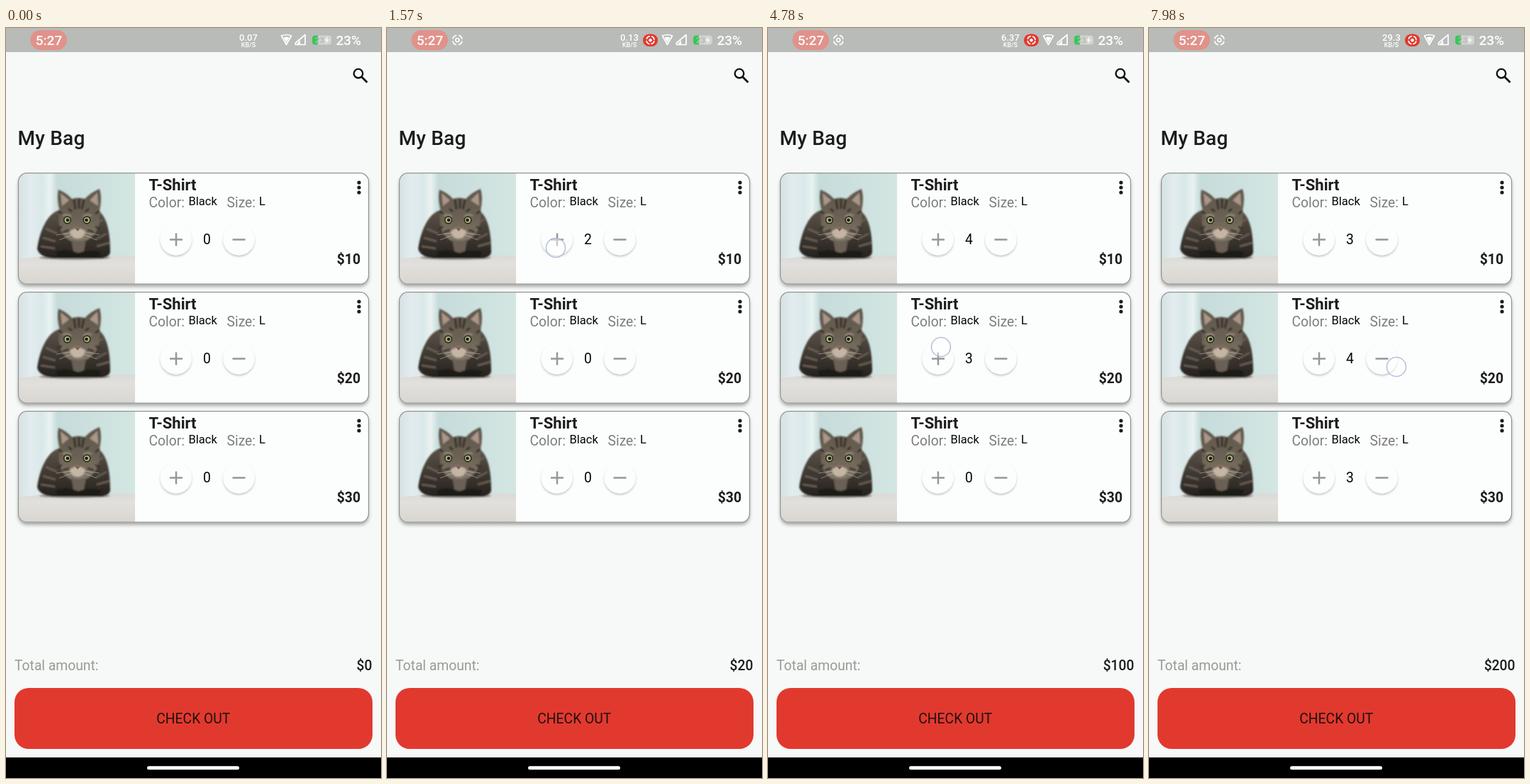
An HTML page that plays this animation: 529 by 1058 pixels, repeating every 8000 ms.

```html
<!DOCTYPE html>
<html lang="en">
<head>
<meta charset="utf-8">
<title>My Bag</title>
<style>
  html, body { margin: 0; height: 100%; overflow: hidden; background: #f6f9f7; }
  svg { display: block; width: 100vw; height: 100vh; font: 19.29px Roboto, sans-serif; fill: #1b1c1b; }
  .status { fill: #fff; font-weight: 500; font-size: 19px; }
  .line { fill: none; stroke: #fff; stroke-width: 1.7; }
  .mid { text-anchor: middle; }
  .end { text-anchor: end; }
  .grey { fill: #7d7e7d; }
  .small { font-size: 16.53px; fill: #050505; }
  .bold { font-weight: 700; }
</style>
</head>
<body>
<svg viewBox="0 0 529 1058" preserveAspectRatio="none">
  <defs>
    <linearGradient id="wall">
      <stop offset="0" stop-color="#d6e2e4"/><stop offset=".1" stop-color="#e3ecee"/>
      <stop offset=".2" stop-color="#dae8e9"/><stop offset=".27" stop-color="#e9f2f1"/>
      <stop offset=".33" stop-color="#c6dcdb"/><stop offset="1" stop-color="#d3e6e2"/>
    </linearGradient>
    <linearGradient id="floor" x2="0" y2="1">
      <stop offset="0" stop-color="#dbd9d6"/><stop offset=".3" stop-color="#e2e0dc"/>
      <stop offset="1" stop-color="#d9d6d1"/>
    </linearGradient>
    <linearGradient id="fur" x2="0" y2="1">
      <stop offset="0" stop-color="#5b5248"/><stop offset="1" stop-color="#25211e"/>
    </linearGradient>
    <linearGradient id="face" x2="0" y2="1">
      <stop offset="0" stop-color="#5d554a"/><stop offset=".55" stop-color="#6b6254"/>
      <stop offset="1" stop-color="#857a6b"/>
    </linearGradient>
    <filter id="soft"><feGaussianBlur stdDeviation=".9"/></filter>
    <filter id="cardShadow" x="-5%" y="-10%" width="110%" height="125%">
      <feDropShadow dx="0" dy="3.500" stdDeviation="2.600" flood-opacity=".34"/>
    </filter>
    <filter id="buttonShadow" x="-20%" y="-20%" width="140%" height="150%">
      <feDropShadow dx="0" dy="2" stdDeviation="1.500" flood-opacity=".23"/>
    </filter>
    <clipPath id="photoClip"><path d="M182 205H30a12 12 0 0 0-12 12v132a12 12 0 0 0 12 12H182z"/></clipPath>

    <g id="photo" clip-path="url(#photoClip)">
      <path d="M18 205h164v156H18z" fill="url(#wall)"/>
      <path d="M18 326l45-5h119v40H18z" fill="url(#floor)"/>
      <g filter="url(#soft)">
        <ellipse cx="97" cy="324" rx="50" ry="3" fill="#96928d"/>
        <path d="M76 257C58 260 47 288 44 312Q48 324 68 325H134Q148 323 147 314C147 290 143 265 129 257z" fill="url(#fur)"/>
        <path d="M52 296l18 5m-21 7l20 3M56 283l16 7m70 0l-15 8m19 5l-18 5m9-38l-10 6" fill="none" stroke="#6b6155" stroke-width="2.500"/>
        <path d="M76 259Q71 241 74 228Q86 233 93 241Q102 238 111 241Q121 231 132 227Q136 240 132 258Q134 276 126 289Q116 302 102 303Q87 302 79 289Q72 273 76 259z" fill="url(#face)"/>
        <path d="M79 251l-2-18 12 10zM118 243l11-11 1 19z" fill="#ab978a"/>
        <path d="M92 298q10 5 21 0l-3 17q-8 4-15 0z" fill="#6b6154"/>
        <path d="M70 316q16-6 32 2q14-7 32-2l-3 8H73z" fill="#1e1a18"/>
        <path d="M96 242l2 14m5-15v14m7-13l-3 14M79 262l-5-4m5 22l-6 4m53-22l6-4m-6 22l6 4M80 288l9-3m35 3l-9-3M88 255l5 4m24-4l-5 4"
          fill="none" stroke="#302a25" stroke-width="2.600"/>
        <path d="M80 265q6-4 12 1m17 0q6-5 12-1" fill="none" stroke="#a59a88" stroke-width="1.500"/>
        <path d="M90 287q11-9 22 0q-2 10-11 10t-11-10z" fill="#c3b6a5"/>
      </g>
      <g fill="#aeb47c" stroke="#28251f" stroke-width="1.500"><circle cx="86.500" cy="271" r="4.800"/><circle cx="114" cy="271" r="4.800"/></g>
      <circle cx="87" cy="271" r="2.300"/><circle cx="113.500" cy="271" r="2.300"/>
      <path d="M97 282h8l-4 5z" fill="#8a5c50"/>
      <path d="M92 289l-21 3m22 0l-18 7m36-10l21 3m-22 0l18 7" fill="none" stroke="#d5cec3" stroke-width=".5"/>
    </g>

    <g id="card">
      <rect x="17.500" y="204.700" width="494" height="156.500" rx="12" fill="#fcfdfd" filter="url(#cardShadow)"/>
      <use href="#photo"/>
      <rect x="17.500" y="204.700" width="494" height="156.500" rx="12" fill="none" stroke="#929592" stroke-width="1.200"/>
      <text x="201.500" y="228.500" class="bold" font-size="22.050">T-Shirt</text>
      <text x="201.500" y="252.500" class="grey">Color:</text>
      <text x="257.500" y="250" class="small">Black</text>
      <text x="311.500" y="252.500" class="grey">Size:</text>
      <text x="357" y="250" class="small">L</text>
      <g fill="#fcfdfd" filter="url(#buttonShadow)"><circle cx="239.700" cy="298.500" r="22"/><circle cx="328.500" cy="298.500" r="22"/></g>
      <path d="M231 298.500h18m-9-9v18M319.500 298.500h18" stroke="#969796" stroke-width="2.500"/>
      <circle cx="498" cy="218" r="2.600"/><circle cx="498" cy="225" r="2.600"/><circle cx="498" cy="232" r="2.600"/>
    </g>
  </defs>

  <rect width="529" height="1058" fill="#f6f9f7"/>
  <rect width="529" height="34" fill="#b8bbb7"/>
  <rect x="34.500" y="3" width="51.500" height="28" rx="14" fill="#e0928b"/>
  <g class="status">
    <text x="60.500" y="23.500" class="mid">5:27</text>
    <text id="speed" x="342" y="17.500" class="mid" font-size="13"></text>
    <text x="342" y="26.500" class="mid" font-size="9">KB/S</text>
    <text x="465.500" y="23.500">23%</text>
    <g id="record">
      <circle cx="99.300" cy="17" r="6.800" class="line" stroke-dasharray="7.680 3" stroke-dashoffset="-1.500"/>
      <circle cx="99.300" cy="17" r="2.500" class="line"/>
      <rect x="361" y="8.500" width="21" height="17.500" rx="8.700" fill="#e2392f"/>
      <circle cx="371.500" cy="17.200" r="5.500" class="line" stroke-dasharray="6.500 2.140" stroke-dashoffset="-1"/>
      <circle cx="371.500" cy="17.200" r="2.300"/>
    </g>
    <path d="M388.500 11q7-3 14 0l-7 12.500z" class="line" stroke-linejoin="round"/>
    <path d="M391.500 13.500q4-2 8 0l-4 7z"/>
    <path d="M422 9.500V23.500H409q-2-1 0-3z" class="line" stroke-linejoin="round"/>
    <path d="M415 17v6h-5z"/>
  </g>
  <rect x="432" y="10.500" width="27" height="13" rx="4" fill="#d1d4cf"/>
  <path d="M440 10.500h-4a4 4 0 0 0-4 4v5a4 4 0 0 0 4 4h4z" fill="#35c858"/>
  <text x="436" y="21" font-size="11.500" font-weight="700" fill="#b5b8b3">23</text>
  <path d="M454 11l-5 7h3l-1 5 5-7h-3z" fill="#f4f5f2"/>

  <circle cx="497" cy="64.200" r="6.300" fill="none" stroke="#111" stroke-width="2.400"/>
  <path d="M501.500 68.700l8 8" stroke="#111" stroke-width="2.900"/>
  <text x="16.500" y="165.300" font-size="28" font-weight="500" letter-spacing=".2">My Bag</text>

  <g id="cards"></g>

  <text x="12" y="906" fill="#999b94">Total amount:</text>
  <text id="total" x="516.500" y="906" class="end" font-weight="500"></text>
  <rect x="12" y="931" width="505" height="86" rx="20" fill="#e2392f"/>
  <text x="264.300" y="980.700" class="mid" fill="#1d100e">CHECK OUT</text>
  <rect y="1029" width="529" height="29" fill="#000"/>
  <rect x="199" y="1041.300" width="130" height="5" rx="2.500" fill="#fff"/>
  <g id="touches"></g>
</svg>
<script>
const LOOP = 8000, ROW_STEP = 168, FADE_IN = 110, FADE_OUT = 220;
const prices = [10, 20, 30];
const speeds = [[0, '0.07'], [480, '0.13'], [3490, '6.37'], [4990, '19.7'], [6490, '29.3']];
// row, x, y, press time, release time, quantity change
const taps = [
  [0, 236, 313, 850, 1010, 1], [0, 237, 311, 1170, 1290, 1],
  [0, 238, 310, 1430, 1590, 1], [0, 238, 311, 1740, 1890, 1],
  [1, 238, 462, 3580, 3690, 1], [1, 238, 463, 3840, 3950, 1],
  [1, 237, 464, 4100, 4230, 1], [1, 244, 450, 4650, 4820, 1],
  [2, 240, 630, 5040, 5160, 1], [2, 242, 628, 5300, 5440, 1],
  [2, 242, 629, 5570, 5690, 1], [2, 242, 629, 5820, 5940, 1],
  [2, 345, 641, 6130, 6240, -1], [0, 345, 310, 7010, 7200, -1],
  [1, 349, 478, 7790, 8100, -1]
];

const byId = id => document.getElementById(id);
const clamp = v => Math.max(0, Math.min(1, v));

byId('cards').innerHTML = prices.map((price, i) => `
  <g transform="translate(0 ${i * ROW_STEP})">
    <use href="#card"/>
    <text x="283.500" y="305.300" class="mid" id="count${i}" fill="#050505"></text>
    <text x="500" y="332.800" class="end bold">$${price}</text>
  </g>`).join('');
byId('touches').innerHTML = taps.map(([, x, y]) =>
  `<circle cx="${x}" cy="${y}" r="13.5" fill="#fff" fill-opacity=".55" stroke="#aeb9d8" stroke-width="1.6"/>`).join('');
const rings = byId('touches').children;

function setText(id, value) {
  const node = byId(id);
  if (node.textContent !== value) node.textContent = value;
}

function draw(now) {
  const t = now % LOOP;
  const counts = [0, 0, 0];
  taps.forEach(([row, , , down, up, change], i) => {
    if (t >= up) counts[row] += change;
    const shown = clamp((t - down) / FADE_IN) * clamp(1 - (t - up) / FADE_OUT);
    rings[i].setAttribute('opacity', shown * 0.85);
  });
  counts.forEach((n, i) => setText('count' + i, String(n)));
  setText('total', '$' + counts.reduce((sum, n, i) => sum + n * prices[i], 0));
  setText('speed', speeds.filter(([start]) => t >= start).pop()[1]);
  byId('record').setAttribute('opacity', clamp((t - 30) / 250));
  requestAnimationFrame(draw);
}
requestAnimationFrame(draw);
</script>
</body>
</html>
```
